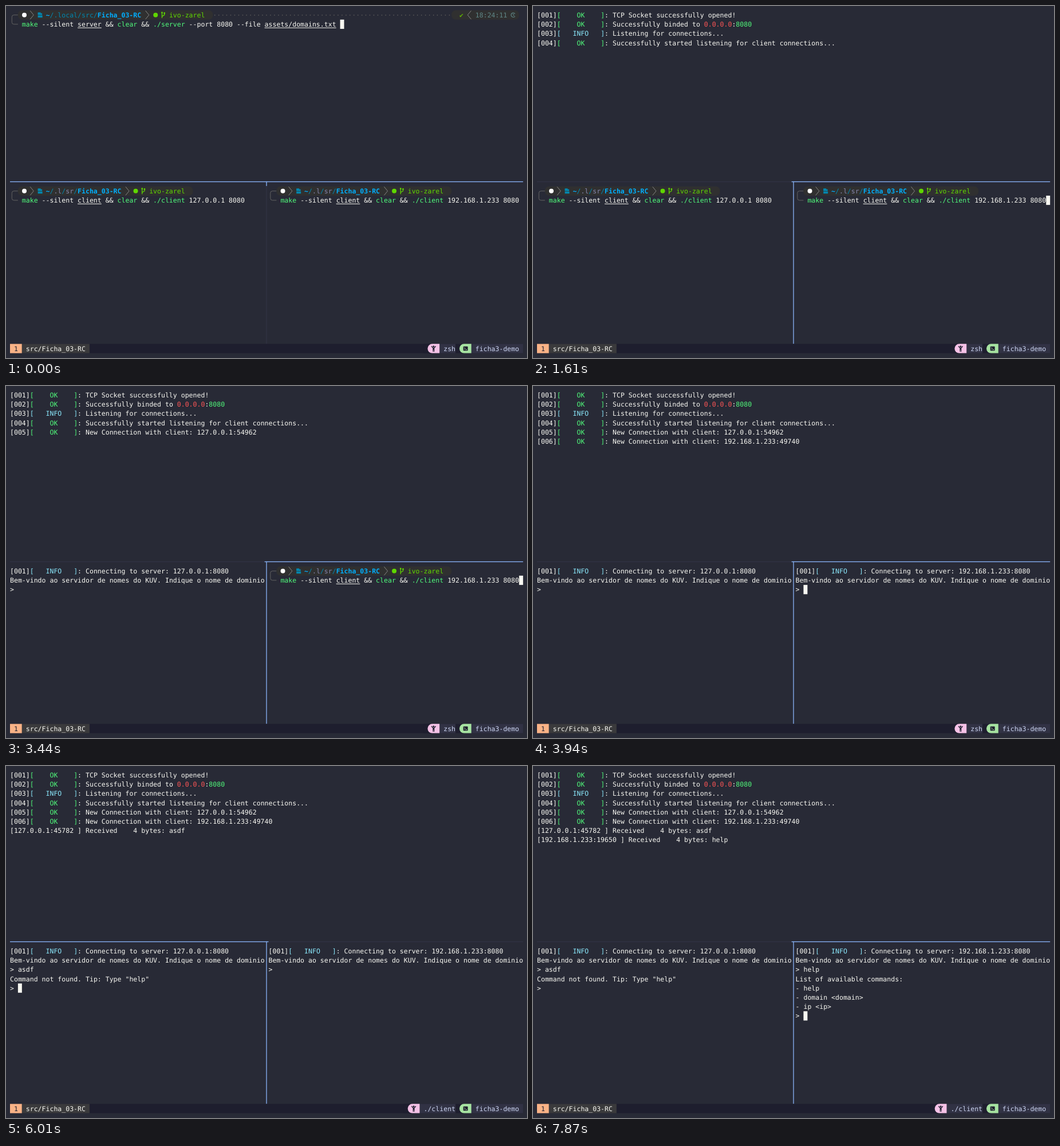
These frames come from a looping animation (910x616 px, 8 s). An HTML page with a canvas:

```html
<!DOCTYPE html>
<html lang="en">
<head>
<meta charset="utf-8">
<title>Terminal session</title>
<style>
  html, body { margin: 0; width: 100%; height: 100%; overflow: hidden; background: #282a36; }
  canvas { display: block; }
</style>
</head>
<body>
<canvas id="screen" width="910" height="616"></canvas>
<script>
const ctx = document.getElementById('screen').getContext('2d');
const LOOP = 8000, CELL_W = 6.947, CELL_H = 16.215, LEFT = 7, TOP = 7.6;
const FONT = '11.54px "DejaVu Sans Mono", monospace';
const RIGHT_COL = 65, LOWER_ROW = 19, STATUS_ROW = 36;

// Colour keys used by the {x} markup; u = underlined, B = bold blue.
const COLORS = {
  w: '#f8f8f2', u: '#f8f8f2', g: '#50fa7b', r: '#ff5555', c: '#8be9fd',
  B: '#00afff', t: '#0087af', p: '#8787af', v: '#5fd700', k: '#5faf00',
  h: '#5f8787', d: '#585858', s: '#cdd6f4', n: '#1e1e2e'
};
const PILL = '#303030', CHEVRON = '#868686', FRAME = '#626262';
const ACTIVE = '#89b4fa', INACTIVE = '#313244';

// Tracks hold [start time, value]; the latest started entry applies.
const focusTrack = [[0, 'top'], [1570, 'left'], [1610, 'right'], [2200, 'left'],
  [3440, 'right'], [4780, 'left'], [6530, 'right']];
const processTrack = [[0, 'zsh'], [1340, './server'], [1570, 'zsh'], [3070, './client'],
  [3440, 'zsh'], [4280, './client']];
const leftTyping = [[0, ''], [5570, 'as'], [5650, 'asdf']];
const rightTyping = [[0, ''], [7410, 'h'], [7490, 'he'], [7560, 'hel'], [7640, 'help']];
const valueAt = (track, t) => track.filter(([start]) => start <= t).pop()[1];

const tag = (number, level) => level === 'OK'
  ? `{w}[00${number}]{g}[    OK    ]{w}: `
  : `{w}[00${number}]{c}[   INFO   ]{w}: `;
const serverLog = [
  [930, tag(1, 'OK') + 'TCP Socket successfully opened!'],
  [930, tag(2, 'OK') + 'Successfully binded to {r}0.0.0.0{w}:{g}8080'],
  [930, tag(3, 'INFO') + 'Listening for connections...'],
  [930, tag(4, 'OK') + 'Successfully started listening for client connections...'],
  [2660, tag(5, 'OK') + 'New Connection with client: 127.0.0.1:54962'],
  [3940, tag(6, 'OK') + 'New Connection with client: 192.168.1.233:49740'],
  [6010, '{w}[127.0.0.1:45782 ] Received    4 bytes: asdf'],
  [7870, '{w}[192.168.1.233:19650 ] Received    4 bytes: help']
];
const WELCOME = '{w}Bem-vindo ao servidor de nomes do KUV. Indique o nome de dominio';

const clients = {
  left: { col: 0, host: '127.0.0.1', start: 2660, typing: leftTyping, replyAt: 6010,
    reply: ['Command not found. Tip: Type "help"'] },
  right: { col: RIGHT_COL, host: '192.168.1.233', start: 3940, typing: rightTyping, replyAt: 7870,
    reply: ['List of available commands:', '- help', '- domain <domain>', '- ip <ip>'] }
};

const x = col => LEFT + col * CELL_W;
const y = row => TOP + row * CELL_H;

function block(col, row, cells, color) {
  ctx.fillStyle = color;
  ctx.fillRect(x(col), y(row), cells * CELL_W, CELL_H);
}

function stroke(color, width, ...points) {
  ctx.strokeStyle = color;
  ctx.lineWidth = width;
  ctx.beginPath();
  points.forEach(([px, py], i) => i ? ctx.lineTo(px, py) : ctx.moveTo(px, py));
  ctx.stroke();
}

function disc(cx, cy, radius, color) {
  ctx.fillStyle = color;
  ctx.beginPath();
  ctx.arc(cx, cy, radius, 0, 7);
  ctx.fill();
}

// Writes marked-up text word by word on the cell grid; returns the end column.
function write(col, row, markup) {
  for (const [, key, text] of markup.matchAll(/\{(\w)\}([^{]*)/g)) {
    ctx.font = (key === 'B' ? 'bold ' : '') + FONT;
    ctx.fillStyle = COLORS[key];
    for (const word of text.matchAll(/\S+/g)) {
      ctx.fillText(word[0], x(col + word.index), y(row) + 12.3);
    }
    if (key === 'u') ctx.fillRect(x(col), y(row) + 13.9, text.length * CELL_W, 1);
    col += text.length;
  }
  return col;
}

function pill(from, to, row) {
  ctx.fillStyle = PILL;
  ctx.beginPath();
  ctx.roundRect(x(from), y(row), (to - from) * CELL_W, CELL_H, 7);
  ctx.fill();
}

function chevron(col, row, direction) {
  const mid = x(col + 0.5), cy = y(row + 0.5), dx = 3.1 * direction;
  stroke(CHEVRON, 1, [mid - dx, cy - 7.5], [mid + dx, cy], [mid - dx, cy + 7.5]);
}

function folderIcon(col, row) {
  const px = x(col), py = y(row) + 3.6;
  ctx.fillStyle = COLORS.t;
  ctx.fillRect(px, py, 5, 3);
  ctx.fillRect(px, py + 1.5, 7.5, 3);
  ctx.fillRect(px, py + 5.3, 8, 3.7);
}

function branchIcon(col, row) {
  const px = x(col) + 1.5, py = y(row);
  stroke(COLORS.v, 1.3, [px, py + 3], [px, py + 13.5]);
  stroke(COLORS.v, 1.3, [px, py + 10.5], [px + 4.2, py + 8], [px + 4.2, py + 4.5]);
  disc(px, py + 4, 1.4, COLORS.v);
  disc(px + 4.2, py + 4.8, 1.4, COLORS.v);
}

function clockIcon(col, row) {
  const cx = x(col) + 3.6, cy = y(row + 0.5);
  ctx.strokeStyle = COLORS.h;
  ctx.lineWidth = 1.2;
  ctx.beginPath();
  ctx.arc(cx, cy, 3.7, 0.6, 5.7);
  ctx.stroke();
  stroke(COLORS.h, 1, [cx, cy - 2.2], [cx, cy + 0.5], [cx + 2, cy + 0.5]);
}

function prompt(col, row, path, pathLength, command) {
  const end = col + 9 + pathLength;
  const bx = x(col) + 3.3, top = y(row) + 8.1, bottom = top + CELL_H;
  ctx.strokeStyle = FRAME;
  ctx.lineWidth = 1;
  ctx.beginPath();
  ctx.moveTo(x(col + 2), top);
  ctx.arcTo(bx, top, bx, bottom, 3.5);
  ctx.arcTo(bx, bottom, x(col + 2), bottom, 3.5);
  ctx.lineTo(x(col + 2), bottom);
  ctx.stroke();

  pill(col + 2, end + 18, row);
  disc(x(col + 3.6), y(row + 0.5), 4, '#ffffff');
  chevron(col + 5, row, 1);
  folderIcon(col + 7, row);
  write(col + 9, row, path);
  chevron(end + 1, row, 1);
  disc(x(end + 3.6), y(row + 0.5), 4, COLORS.v);
  branchIcon(end + 5, row);
  write(end + 7, row, '{v}ivo-zarel');
  return [write(col + 3, row + 1, command), row + 1];
}

// Pane painters return the cursor cell.
function topPane(t) {
  if (t >= 930) {
    const lines = serverLog.filter(([start]) => start <= t);
    lines.forEach(([, text], row) => write(0, row, text));
    return [0, lines.length];
  }
  write(51, 0, '{d}' + '·'.repeat(60));
  pill(111, 128, 0);
  write(113, 0, '{k}✔');
  chevron(115, 0, -1);
  write(117, 0, '{h}18:24:11');
  clockIcon(126, 0);
  return prompt(0, 0, '{B}~{t}/.local/src/{B}Ficha_03-RC', 24,
    '{g}make{w} --silent {u}server{w} && {g}clear{w} && {g}./server' +
    '{w} --port 8080 --file {u}assets/domains.txt{w} ');
}

function clientPane({ col, host, start, typing, replyAt, reply }, t) {
  let row = LOWER_ROW;
  if (t < start) {
    const space = col ? '' : ' ';
    return prompt(col, row, '{B}~{t}/{p}.l{t}/{p}sr{t}/{B}Ficha_03-RC', 19,
      `{g}make{w} --silent {u}client{w} && {g}clear{w} && {g}./client{w} ${host} 8080${space}`);
  }
  write(col, row++, tag(1, 'INFO') + `Connecting to server: ${host}:8080`);
  write(col, row++, WELCOME);
  const end = write(col, row, '{w}> ' + valueAt(typing, t));
  if (t < replyAt) return [end, row];
  for (const line of reply) write(col, ++row, '{w}' + line);
  return [write(col, ++row, '{w}> '), row];
}

function borders(focus) {
  const lineY = y(18.5) - 0.7, lineX = x(64.5) - 0.7, right = x(129), bottom = y(STATUS_ROW);
  const rect = (color, ...box) => { ctx.fillStyle = color; ctx.fillRect(...box); };
  rect(INACTIVE, LEFT, lineY, right - LEFT, 1.3);
  rect(focus === 'top' ? INACTIVE : ACTIVE, lineX, lineY, 1.3, bottom - lineY);
  if (focus === 'top') rect(ACTIVE, lineX, lineY, 1.3, CELL_H / 2);
  const from = focus === 'right' ? x(64) : LEFT;
  const to = focus === 'left' ? x(65) : right;
  rect(ACTIVE, from, lineY, to - from, 1.3);
}

function badge(col, color) {
  ctx.fillStyle = color;
  ctx.beginPath();
  ctx.roundRect(x(col), y(STATUS_ROW), 3 * CELL_W, CELL_H, [8, 0, 0, 8]);
  ctx.fill();
}

function statusBar(process) {
  const row = STATUS_ROW, cy = y(row + 0.5), dark = COLORS.n;
  block(0, row, 129, dark);
  block(0, row, 3, '#fab387');
  write(1, row, '{n}1');
  block(3, row, 17, '#3a3a3c');
  write(4, row, '{w}src/Ficha_03-RC');

  const col = 109 - process.length;
  block(col + 2, row, 111 - col, INACTIVE);
  block(col, row, 1, dark);
  ctx.fillStyle = dark;
  const start = 112 - process.length - 4;
  ctx.fillRect(x(start - 1), y(row), 4 * CELL_W, CELL_H);
  badge(start, '#f5c2e7');
  const px = x(start + 1.5);
  disc(px, cy - 3.7, 1.5, dark);
  stroke(dark, 1.3, [px - 3.7, cy - 4.2], [px - 1.2, cy - 1], [px + 1.2, cy - 1], [px + 3.7, cy - 4.2]);
  stroke(dark, 2.6, [px, cy - 1.5], [px, cy + 2.2]);
  stroke(dark, 1.1, [px - 0.9, cy + 1], [px - 0.9, cy + 5.5]);
  stroke(dark, 1.1, [px + 0.9, cy + 1], [px + 0.9, cy + 5.5]);
  write(start + 4, row, '{s}' + process);

  block(112, row, 1, dark);
  badge(113, '#a6e3a1');
  const tx = x(114) - 0.3;
  ctx.fillStyle = dark;
  ctx.beginPath();
  ctx.roundRect(tx, cy - 3.8, 8, 7.6, 1);
  ctx.fill();
  stroke('#a6e3a1', 1, [tx + 1.5, cy - 2], [tx + 3.5, cy], [tx + 1.5, cy + 2]);
  stroke('#a6e3a1', 1, [tx + 4, cy + 2], [tx + 6.5, cy + 2]);
  block(116, row, 13, INACTIVE);
  write(117, row, '{s}ficha3-demo');
}

function render(now) {
  const t = now % LOOP, focus = valueAt(focusTrack, t);
  ctx.textRendering = 'geometricPrecision';
  ctx.fillStyle = '#282a36';
  ctx.fillRect(0, 0, 910, 616);
  const cursors = {
    top: topPane(t),
    left: clientPane(clients.left, t),
    right: clientPane(clients.right, t)
  };
  borders(focus);
  statusBar(valueAt(processTrack, t));
  block(...cursors[focus], 1, COLORS.w);
  requestAnimationFrame(render);
}
requestAnimationFrame(render);
</script>
</body>
</html>
```
